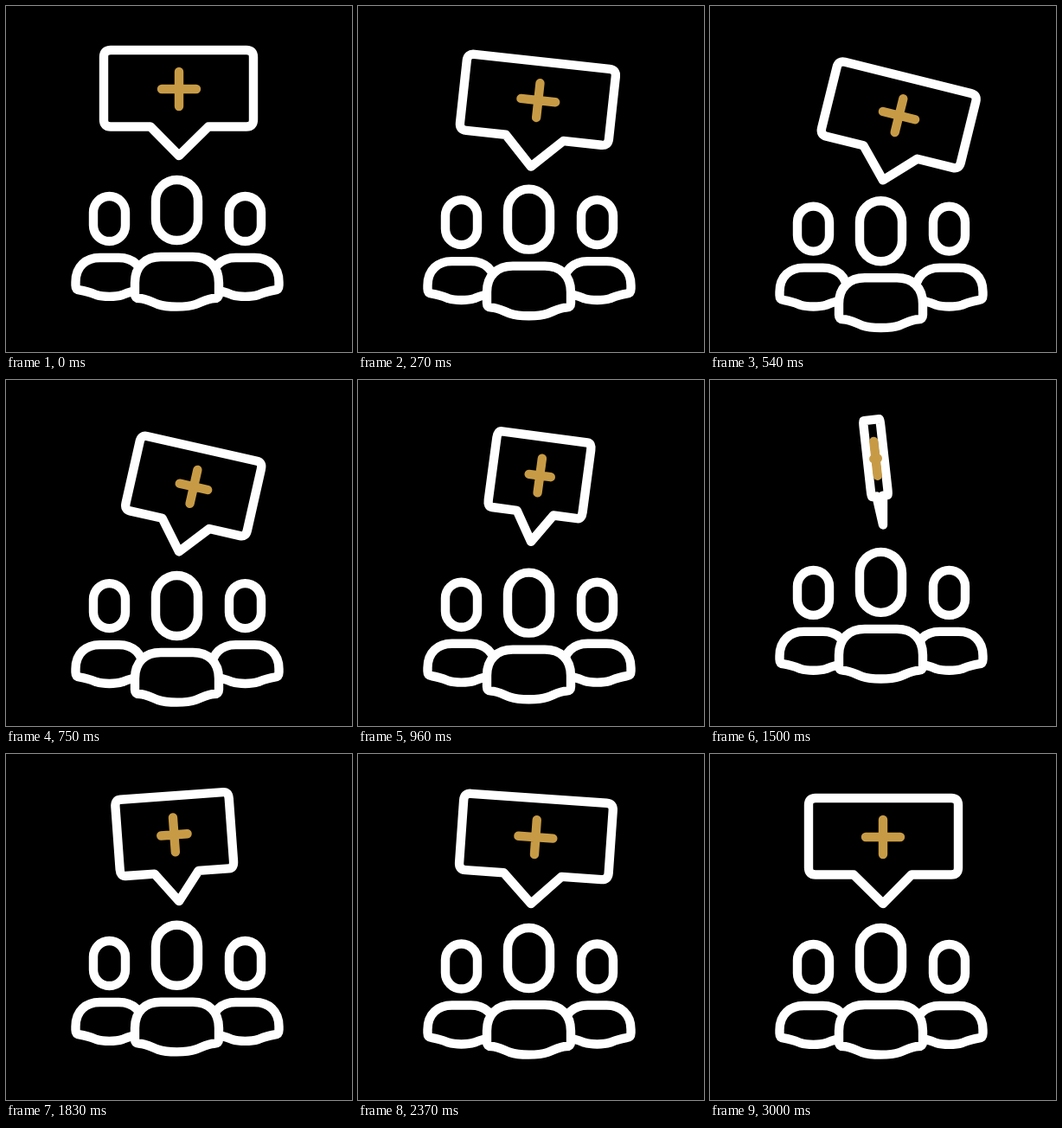
An HTML page that plays this animation: 400 px wide and 400 px high, repeating every 5090 ms.

```html
<!DOCTYPE html>
<html lang="en">
<head>
<meta charset="utf-8">
<title>Health talk</title>
<style>
  html, body { margin: 0; width: 100%; height: 100%; overflow: hidden; background: #000; }
  svg { display: block; width: 100%; height: 100%; }
  svg * { vector-effect: non-scaling-stroke; }
</style>
</head>
<body>
<svg viewBox="0 0 400 400" fill="#000" stroke="#fff" stroke-width="10.4" stroke-linecap="round" stroke-linejoin="round">
  <defs>
    <g id="side">
      <rect x="-18.5" y="220" width="37" height="52" rx="18.5"/>
      <path d="M-39 323V319C-39 301 -27 291 -11 291H11C27 291 39 301 39 319V323Q39 328 34 328.5C26 329.5 20 332 15 334C7 336.5 -7 336.5 -15 334C-20 332 -26 329.5 -34 328.5Q-39 328 -39 323Z"/>
    </g>
  </defs>
  <g id="sides">
    <use href="#side" x="119.5"/>
    <use href="#side" x="276.5"/>
  </g>
  <g id="middle">
    <rect x="173" y="201" width="49" height="70" rx="24.5"/>
    <path d="M149 333V320C149 301 161 290 179 290H216C234 290 246 301 246 320V333Q246 338 241 338C234 338 227 342 219 345C209 348.5 186 348.5 176 345C168 342 161 338 154 338Q149 338 149 333Z"/>
  </g>
  <!-- The speech bubble is drawn around its tip. -->
  <g id="bubble">
    <path d="M0 0L-33 -33.5H-79Q-87 -33.5 -87 -41.5V-114Q-87 -122 -79 -122H78Q86 -122 86 -114V-41.5Q86 -33.5 78 -33.5H34Z"/>
    <path d="M-20 -77H20M0 -97V-57" stroke="#c79b46"/>
  </g>
</svg>
<script>
const LOOP = 5090, STEP = 30;

const ramp = (t, from, to) => Math.min(1, Math.max(0, (t - from) / (to - from)));
const ease = u => u * u * (3 - 2 * u);

// Eases from 0 at the start through each [time, value] in turn
function swing(t, ...stops) {
  let time = 0, value = 0, sum = 0;
  for (const [end, next] of stops) {
    sum += (next - value) * ease(ramp(t, time, end));
    time = end;
    value = next;
  }
  return sum;
}

const place = (id, value) => document.getElementById(id).setAttribute("transform", value);

function draw(ms) {
  const t = Math.floor((ms % LOOP) / STEP) * STEP;

  // Half a turn about the upright axis, quicker once edge-on
  const turn = (ramp(t, 330, 1450) + ramp(t, 1450, 2140)) * Math.PI / 2;
  const tilt = swing(t, [590, 14.2], [1580, -6.7], [2370, 4], [3000, 0]);
  const tip = 173 + swing(t, [590, 29], [1400, -5.8], [2250, 0]);

  place("bubble", `translate(200 ${tip}) rotate(${tilt}) scale(${Math.cos(turn)} 1)`);
  place("middle", `translate(0 ${swing(t, [600, 25], [780, 25], [1630, -4], [2360, 0])})`);
  place("sides", `translate(0 ${swing(t, [790, 15.2], [1790, -4], [2520, 0])})`);
}

const start = performance.now();
function tick() {
  draw(performance.now() - start);
  requestAnimationFrame(tick);
}
tick();
</script>
</body>
</html>
```
